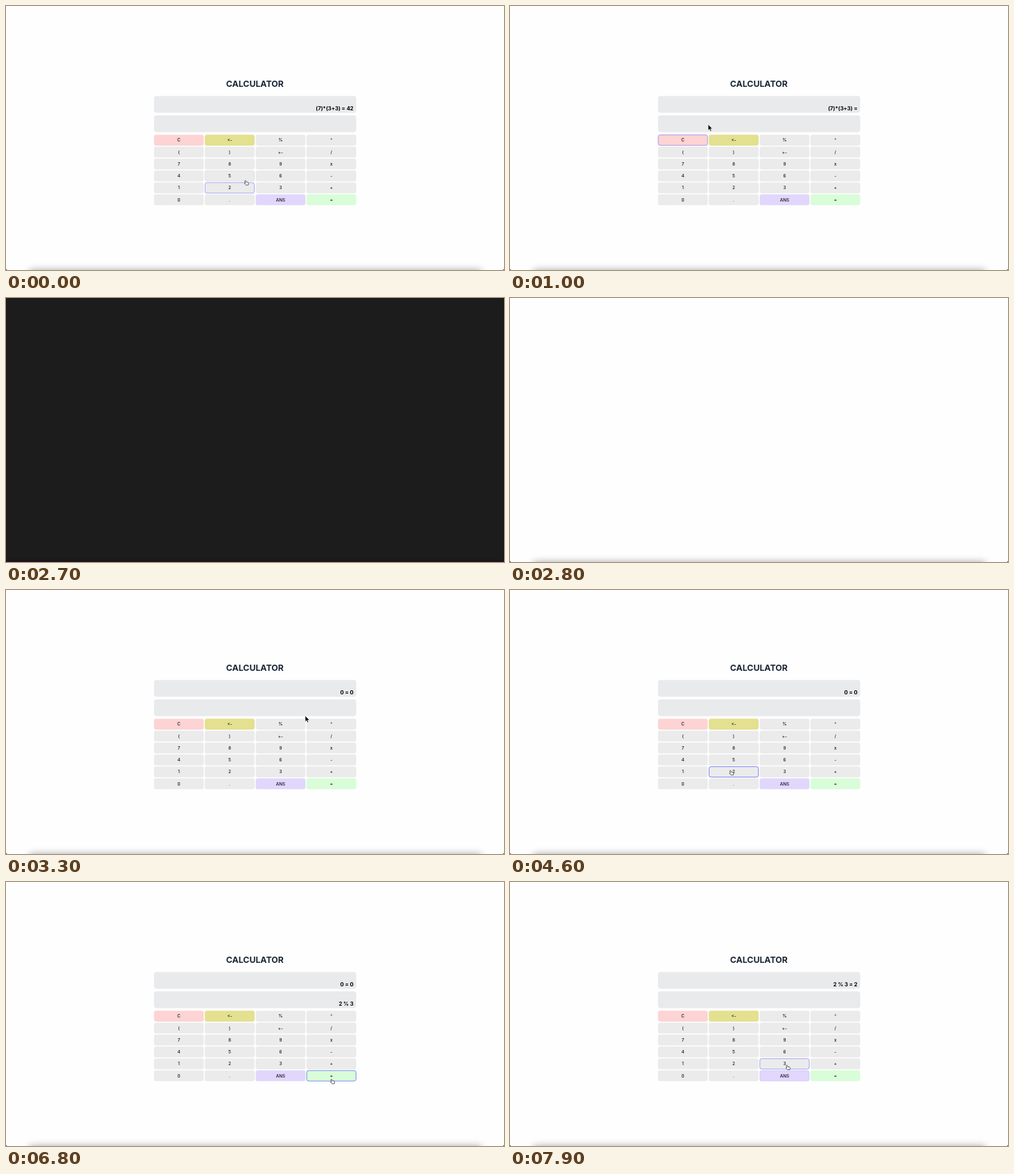
Write an HTML page that moves like this. It is 719 px wide and 382 px high and loops after 8 s.

```html
<!DOCTYPE html>
<html lang="en">
<head>
<meta charset="utf-8">
<title>Calculator</title>
<style>
  html, body { margin: 0; width: 100%; height: 100%; overflow: hidden; background: #fefefe; }
  svg { display: block; width: 100%; height: 100%; }
  text { font-family: Inter, Roboto, sans-serif; font-feature-settings: "calt" 0, "liga" 0; }
  .title { font-size: 12.3px; font-weight: 700; fill: #1a2636; text-anchor: middle; }
  .line { font-size: 7.7px; font-weight: 700; fill: #000; text-anchor: end; }
  .label { font-size: 6.3px; font-weight: 500; fill: #141414; text-anchor: middle; }
  .ring { fill: none; stroke: #646cff; stroke-width: .8; }
</style>
</head>
<body>
<svg id="stage" viewBox="0 0 719 382" preserveAspectRatio="none">
  <defs>
    <filter id="soft" x="-10%" y="-100%" width="120%" height="300%">
      <feGaussianBlur stdDeviation="6"/>
    </filter>
  </defs>
  <rect width="719" height="382" fill="#fefefe"/>
  <rect x="34" y="383" width="652" height="30" fill="#000" opacity=".42" filter="url(#soft)"/>
  <path d="M0 380.5V382H1.5ZM719 380.5V382H717.5Z" fill="#222"/>
  <g id="app">
    <text class="title" x="359.3" y="116.6">CALCULATOR</text>
    <g id="panel"/>
    <text class="line" id="past" x="501.7" y="150.8"/>
    <text class="line" id="entry" x="501.7" y="178.9"/>
  </g>
  <path id="arrow" d="M0 0V8.6L2 6.8L3.3 9.8L4.8 9.1L3.5 6.3H6.2Z" fill="#000" stroke="#fff" stroke-width=".6"/>
  <path id="hand" d="M-.7 .5Q0 -.5 .8 .4L1.6 2.2L3.9 2.6Q4.9 2.9 4.8 4.2L4.4 6.5H1.1L-1.2 4.3Q-1.2 3.3 .3 3.7Z"
        fill="#fff" stroke="#222" stroke-width=".7" stroke-linejoin="round"/>
  <g id="blank">
    <rect width="719" height="382" fill="#1c1c1c"/>
    <path d="M0 380H719" stroke="#20131b" stroke-width="3"/>
    <path d="M718.5 0V382" stroke="#151515"/>
  </g>
</svg>
<script>
const $ = id => document.getElementById(id);
const LOOP = 8000, STEP = 100, FADE = 160, SAMPLES = 16;
const LEFT = 213.7, W = 71.8, H = 15.7, GAP = 1.58;
const rows = ['C <- % ^', '( ) +- /', '7 8 9 x', '4 5 6 -', '1 2 3 +', '0 . ANS ='];
const tints = { 'C': '#fdd3d3', '<-': '#e3e08f', 'ANS': '#e1d6fc', '=': '#d9fdd8' };

function add(tag, attrs, text = '') {
  const el = document.createElementNS('http://www.w3.org/2000/svg', tag);
  for (const k in attrs) el.setAttribute(k, attrs[k]);
  el.textContent = text;
  return $('panel').appendChild(el);
}

for (const y of [130.2, 158.2])
  add('rect', { x: LEFT, y, width: 4 * W + 3 * GAP, height: 24.2, rx: 3.6, fill: '#e8eaec' });

const keys = {};
rows.forEach((row, r) => row.split(' ').forEach((label, c) => {
  const x = LEFT + c * (W + GAP), y = 186.2 + r * (H + GAP);
  add('rect', { x, y, width: W, height: H, rx: 3, fill: tints[label] || '#ebebeb' });
  add('text', { class: 'label', x: x + W / 2, y: y + H / 2 + 2.2 }, label);
  const ring = add('rect',
    { class: 'ring', x: x + .3, y: y + .3, width: W - .6, height: H - .6, rx: 2.8 });
  keys[label] = { x, y, ring };
}));

// Point near the middle of a key
const at = (label, dx = 0, dy = 0) =>
  [keys[label].x + W / 2 + dx, keys[label].y + H / 2 + dy];

// Pointer glides: start time, end time, goal
const home = [351, 256];
const glides = [
  [-100, 600, at('C')],
  [900, 1300, [483, 49]],
  [1600, 2200, [500, -14]],
  [2800, 3300, [432, 182]],
  [3500, 4000, at('5', -2, -2)],
  [4300, 4500, at('2', -5, -2)],
  [5100, 5500, at('%')],
  [5700, 6000, at('3', 3, 3)],
  [6300, 6700, at('=', 0, 5)],
  [7550, 7950, at('3', 0, 1)]
];
// Text on the two display lines from a given time
const past = [[0, '(7)*(3+3) = 42'], [800, '(7)*(3+3) ='], [2700, '0 = 0'], [6900, '2 % 3 = 2']];
const entry = [[0, ''], [5000, '2'], [5600, '2 %'], [6200, '2 % 3'], [6900, '']];

const ease = u => u * u * (3 - 2 * u);
const clamp = u => Math.min(1, Math.max(0, u));

function pointer(t) {
  return glides.reduce((pos, [from, to, goal]) => {
    const e = ease(clamp((t - from) / (to - from)));
    return pos.map((v, i) => v + (goal[i] - v) * e);
  }, home);
}

const over = (k, [x, y]) => x >= k.x && x <= k.x + W && y >= k.y && y <= k.y + H;
const latest = (list, t) => list.filter(e => e[0] <= t).pop()[1];
const show = (id, on) => $(id).style.display = on ? '' : 'none';

function draw(t) {
  show('blank', t >= 2700 && t < 2800);
  show('app', t < 2800 || t >= 2900);
  $('past').textContent = latest(past, t);
  $('entry').textContent = latest(entry, t);

  // A ring fades with the share of recent time spent over its key
  const trail = Array.from({ length: SAMPLES }, (_, i) => pointer(t - i * FADE / SAMPLES));
  const all = Object.values(keys);
  for (const k of all)
    k.ring.setAttribute('opacity', trail.filter(p => over(k, p)).length / SAMPLES);

  const onKey = all.some(k => over(k, trail[0]));
  show('hand', onKey);
  show('arrow', !onKey);
  for (const id of ['hand', 'arrow']) $(id).setAttribute('transform', `translate(${trail[0]})`);
}

const start = performance.now();
function tick() {
  const t = (performance.now() - start) % LOOP;
  draw(Math.floor(t / STEP) * STEP);
  requestAnimationFrame(tick);
}
tick();
</script>
</body>
</html>
```
